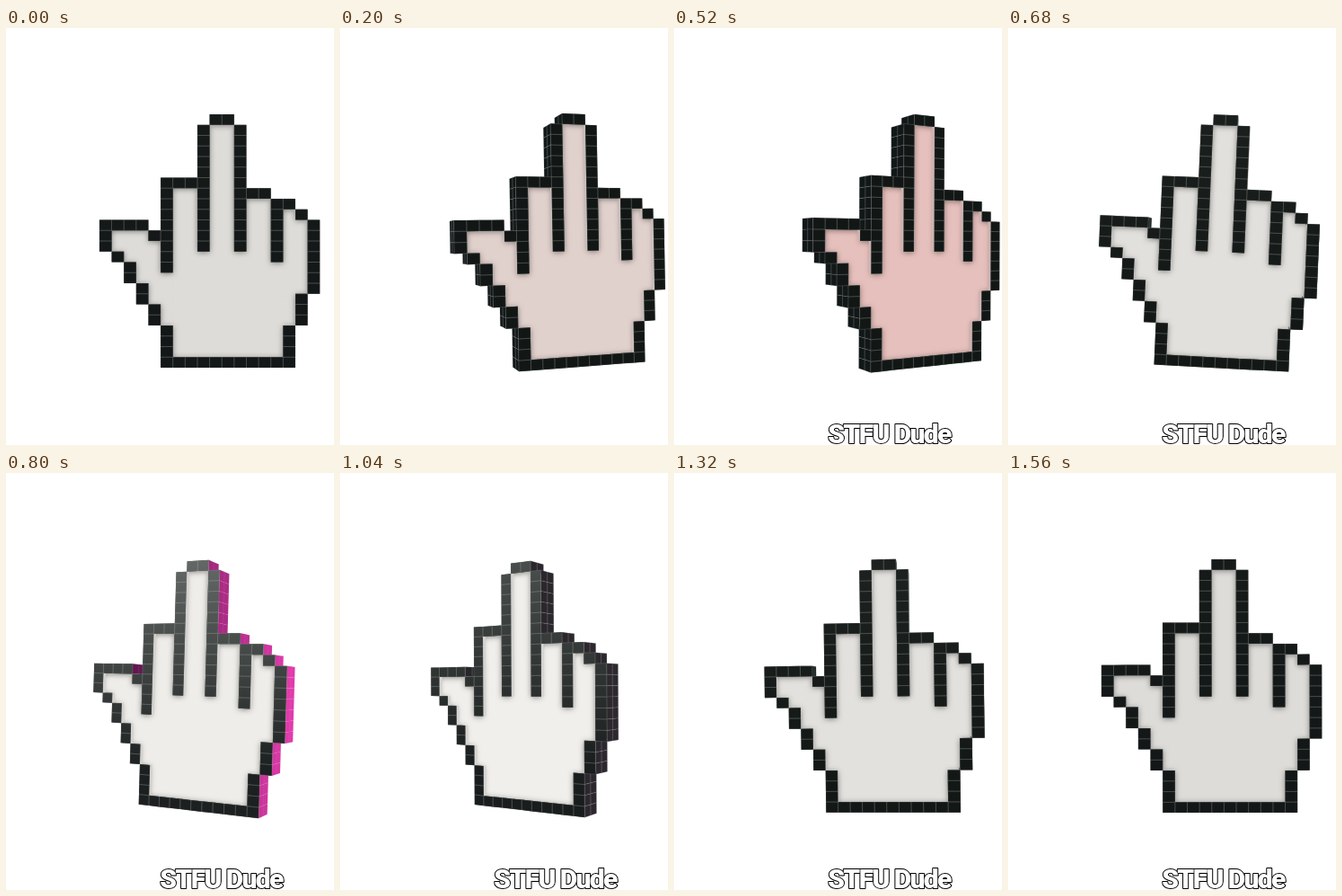
Write an HTML page with a canvas that moves like this. It is 365x464 px and loops after 1.6 s.

```html
<!DOCTYPE html>
<html lang="en">
<head>
<meta charset="utf-8">
<title>Voxel hand</title>
<style>
html, body { margin: 0; width: 100%; height: 100%; overflow: hidden; background: #fff; }
canvas, svg { position: absolute; left: 0; top: 0; width: 365px; height: 464px; }
text {
  font: 900 30px Roboto, "Open Sans", sans-serif;
  letter-spacing: -1.6px;
  fill: #fff; stroke: #000; stroke-width: 2px; stroke-linejoin: round; paint-order: stroke;
}
</style>
</head>
<body>
<canvas width="365" height="464"></canvas>
<svg><text id="label" x="239.5" y="461.5" text-anchor="middle">STFU Dude</text></svg>
<script>
const LOOP = 1600, STEP = 40, TEXT_AT = 400;
const COLS = 18, ROWS = 24, CW = 13.63, CH = 11.75;
const CX = 226.6, CY = 237, DIST = 750;
const PIVOT_X = 22, PIVOT_Z = 75;
const DEPTH = 27, RECESS = 5;
const ctx = document.querySelector('canvas').getContext('2d');
const label = document.getElementById('label');

// corners of the closed outline, as column and row
const OUTLINE = [
  [5, 23], [5, 20], [4, 19], [1, 13], [0, 12], [0, 10], [3, 10], [5, 12], [5, 6], [8, 6],
  [8, 1], [9, 0], [10, 0], [11, 1], [11, 6], [12, 7], [13, 7], [14, 8], [15, 8],
  [17, 10], [17, 16], [16, 17], [16, 19], [15, 20], [15, 23]
];

const grid = Array.from({ length: ROWS }, () => Array(COLS).fill(0));
const at = (c, r) => (grid[r] && grid[r][c]) || 0;

function line([c0, r0], [c1, r1]) {
  const n = Math.max(Math.abs(c1 - c0), Math.abs(r1 - r0));
  for (let i = 0; i <= n; i++)
    grid[Math.round(r0 + (r1 - r0) * i / n)][Math.round(c0 + (c1 - c0) * i / n)] = 1;
}

// palm cells have outline above, below, left and right
function enclosed(c, r) {
  const row = grid[r], col = grid.map(line => line[c]);
  return row.indexOf(1) < c && row.lastIndexOf(1) > c && col.indexOf(1) < r && col.lastIndexOf(1) > r;
}

OUTLINE.forEach((p, i) => line(p, OUTLINE[(i + 1) % OUTLINE.length]));
line([5, 12], [5, 14]);
line([8, 6], [8, 12]);
line([11, 6], [11, 12]);
line([14, 8], [14, 13]);

const dark = [], palm = [];
for (let r = 0; r < ROWS; r++)
  for (let c = 0; c < COLS; c++) {
    if (at(c, r) === 1) dark.push({ c, r });
    else if (enclosed(c, r)) palm.push({ c, r });
  }
for (const { c, r } of palm) grid[r][c] = 2;
const cells = dark.concat(palm);

const YAW = [[0, 0], [200, 17], [480, 32], [800, -25], [980, -35], [1320, -4], [1560, 0]];

// Hermite curve through the poses, level at its turning points
function yawAt(t) {
  const last = YAW.length - 1;
  if (t <= 0 || t >= YAW[last][0]) return 0;
  const slope = i => (YAW[i + 1][1] - YAW[i][1]) / (YAW[i + 1][0] - YAW[i][0]);
  const tangent = i => {
    if (i === 0 || i === last) return 0;
    const a = slope(i - 1), b = slope(i);
    return a * b <= 0 ? 0 : 2 * a * b / (a + b);
  };
  const i = YAW.findIndex(key => key[0] > t) - 1, [t0, a] = YAW[i], [t1, b] = YAW[i + 1];
  const d = t1 - t0, k = (t - t0) / d, m = 1 - k;
  return a * (1 + 2 * k) * m * m + b * k * k * (3 - 2 * k) + d * k * m * (tangent(i) * m - tangent(i + 1) * k);
}

// the hand leans against its recent turn
const rollAt = t => -.13 * (yawAt(t) - yawAt(t - 80));

const bell = (x, mid, width) => Math.exp(-(((x - mid) / width) ** 2));
const mix = (a, b, k) => a.map((v, i) => v + (b[i] - v) * k);
const rgb = v => `rgb(${v.map(Math.round).join(',')})`;

function camera(yaw, roll) {
  const s = Math.sin(yaw), c = Math.cos(yaw), rs = Math.sin(roll), rc = Math.cos(roll);
  return (col, row, z = 0) => {
    const u = (col - COLS / 2) * CW - PIVOT_X, v = (row - ROWS / 2) * CH, w = z + PIVOT_Z;
    const x = u * c + w * s + PIVOT_X, depth = w * c - u * s - PIVOT_Z, k = DIST / (DIST - depth);
    return [CX + (x * rc - v * rs) * k, CY + (x * rs + v * rc) * k];
  };
}

function quad(points) {
  points.forEach(([x, y], i) => i ? ctx.lineTo(x, y) : ctx.moveTo(x, y));
  ctx.closePath();
}

function face(view, { c, r }, z = 0) {
  quad([view(c, r, z), view(c + 1, r, z), view(c + 1, r + 1, z), view(c, r + 1, z)]);
}

function wall(view, col, r, z0, z1) {
  quad([view(col, r, z0), view(col, r, z1), view(col, r + 1, z1), view(col, r + 1, z0)]);
}

function paint(fill, stroke, width, trace) {
  ctx.beginPath();
  trace();
  ctx.fillStyle = fill;
  ctx.fill();
  ctx.strokeStyle = stroke;
  ctx.lineWidth = width;
  ctx.stroke();
}

function gradient(x0, y0, x1, y1, from, to) {
  const g = ctx.createLinearGradient(x0, y0, x1, y1);
  g.addColorStop(0, rgb(from));
  g.addColorStop(1, rgb(to));
  return g;
}

function draw(t) {
  const deg = yawAt(t), rad = Math.PI / 180;
  const view = camera(deg * rad, rollAt(t) * rad);
  const shine = bell(deg, -24, 14), glow = bell(deg, -25, 4.5);
  const lit = deg > 0 ? [230, 192, 188] : [241, 239, 235];
  const tone = mix([222, 220, 216], lit, Math.min(1, Math.abs(deg) / 30) ** (deg > 0 ? 1.6 : .7));
  ctx.clearRect(0, 0, 365, 464);

  // palm, set back behind the outline
  const flat = rgb(tone);
  paint(flat, flat, 1, () => cells.forEach(p => face(view, p, -RECESS)));

  // soft shade cast by the outline
  ctx.save();
  ctx.beginPath();
  cells.forEach(p => face(view, p));
  ctx.clip();
  ctx.shadowColor = 'rgba(0,0,0,.45)';
  ctx.shadowBlur = 6;
  ctx.shadowOffsetY = 1;
  ctx.fillStyle = '#141918';
  ctx.beginPath();
  dark.forEach(p => face(view, p));
  ctx.fill();
  ctx.restore();

  // side walls turned towards the viewer
  const dir = deg > 0 ? -1 : 1;
  const inner = rgb(mix(tone, [150, 150, 150], .3));
  const base = mix([18, 23, 24], [44, 47, 47], shine);
  const side = gradient(140, 0, 315, 0, mix(base, [95, 22, 78], glow), mix(base, [226, 58, 172], glow));
  const seam = `rgba(165,170,172,${.28 - .18 * glow})`;
  if (Math.abs(deg) > .3) {
    for (const { c, r } of dark) {
      const next = at(c + dir, r), col = dir > 0 ? c + 1 : c;
      if (next === 2) paint(inner, inner, .3, () => wall(view, col, r, 0, -RECESS));
      if (!next) {
        paint(side, seam, .6, () => {
          wall(view, col, r, 0, -DEPTH / 2);
          wall(view, col, r, -DEPTH / 2, -DEPTH);
        });
      }
    }
  }

  // outline, lit from above while it faces left
  const ink = [18, 23, 22];
  const front = gradient(0, 96, 0, 330, mix(ink, [100, 105, 103], shine), mix(ink, [28, 32, 32], shine));
  paint(front, 'rgba(170,182,178,.26)', .7, () => dark.forEach(p => face(view, p)));

  label.style.visibility = t >= TEXT_AT ? 'visible' : 'hidden';
}

const start = performance.now();
function tick(now) {
  const t = Math.max(0, now - start) % LOOP;
  draw(Math.floor(t / STEP) * STEP);
  requestAnimationFrame(tick);
}
draw(0);
requestAnimationFrame(tick);
</script>
</body>
</html>
```
